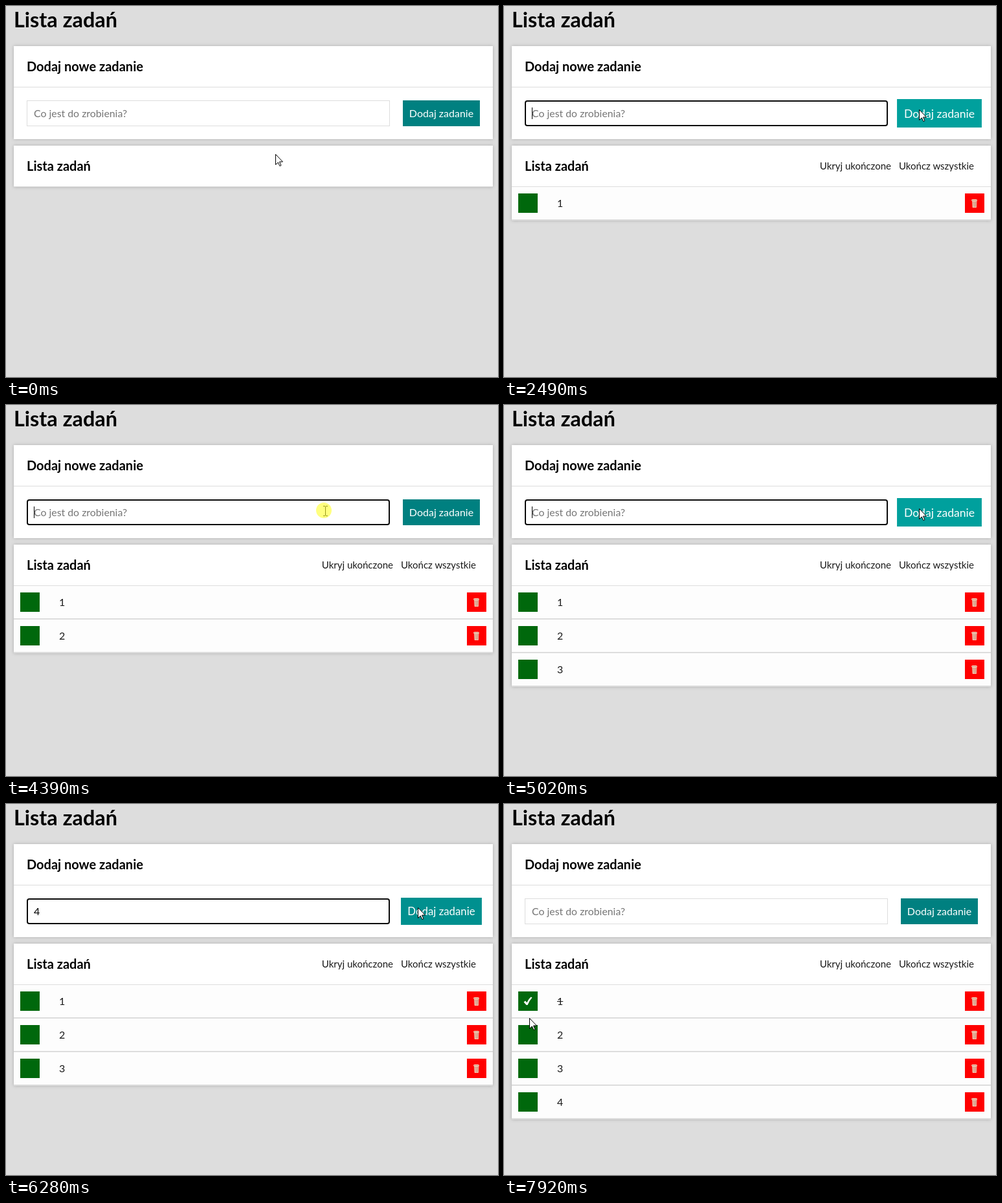
Recreate the animation shown at these times as an HTML page. Size 760 by 574 pixels, loop 8 s.

```html
<!DOCTYPE html>
<html lang="pl">
<head>
<meta charset="utf-8">
<title>Lista zadań</title>
<style>
  html, body { margin: 0; width: 100%; height: 100%; overflow: hidden; }
  body { position: relative; background: #ddd; color: #000; font: 16px Lato, sans-serif; cursor: default; }
  body * { box-sizing: border-box; }
  h1, h2 { margin: 0; font-weight: 700; white-space: nowrap; }
  h1 { position: absolute; left: 12px; top: 1px; font-size: 32.4px; }
  h2 { height: 64px; padding-left: 20px; border-bottom: 1px solid #ddd; font-size: 20px; line-height: 63px; }
  section { position: absolute; left: 12px; width: 740px; background: #fff; box-shadow: 0 0 5px #aaa; }
  #form { top: 62px; height: 144px; }
  #list { top: 216px; }
  #field, #add { position: absolute; top: 84px; height: 40px; line-height: 40px; white-space: nowrap; }
  #field { left: 20px; width: 561px; padding-left: 11px; box-shadow: inset 0 0 0 1px #ddd; }
  #field.focus { border-radius: 4px; box-shadow: inset 0 0 0 2px #0a0a0a; }
  #caret { display: inline-block; width: 1px; height: 18px; margin-right: -1px; background: #000; vertical-align: -3px; }
  #hint { color: #757575; font-size: 15.85px; }
  #add { left: 601px; width: 119px; text-align: center; color: #fff; }
  #links { position: absolute; right: 26px; top: 0; display: flex; gap: 12px; color: #1a1a1a; font-size: 15px; line-height: 63px; white-space: nowrap; }
  .row { position: relative; height: 52px; background: #fdfdfd; border-bottom: 2px solid #ddd; line-height: 30px; }
  .row > * { position: absolute; top: 10px; height: 30px; }
  .box { left: 10px; width: 30px; background: #00680c; }
  .box.hover { background: #007c10; }
  .label { left: 70px; color: #1a1a1a; }
  .bin { left: 700px; width: 30px; background: #f00; }
  .done .label { text-decoration: line-through; }
  .tick { visibility: hidden; }
  .done .tick { visibility: visible; }
  svg { display: block; }
  #pointer { position: absolute; left: 0; top: 0; overflow: visible; }
</style>
</head>
<body>
<h1>Lista zadań</h1>
<section id="form">
  <h2>Dodaj nowe zadanie</h2>
  <div id="field"><span id="typed"></span><span id="caret"></span><span id="hint">Co jest do zrobienia?</span></div>
  <div id="add">Dodaj zadanie</div>
</section>
<section id="list">
  <h2>Lista zadań</h2>
  <div id="links"><span>Ukryj ukończone</span><span>Ukończ wszystkie</span></div>
</section>
<svg id="pointer" width="1" height="1">
  <path id="arrow" d="M.5 .5V16.5L4.3 13L6.9 18.6L9 17.6L6.5 12H11.5Z" fill="#fff" stroke="#000"/>
  <path id="beam" d="M-3 -7.5H0M1 -7.5H4M.5 -7V7M-3 7.5H0M1 7.5H4" fill="none" stroke="#333"/>
  <circle id="press" cx="-2" cy="-1" r="12" fill="#ff0" fill-opacity=".5"/>
</svg>
<script>
const LOOP = 8000, TICK = 125.4, CHECK = 62;
const $ = id => document.getElementById(id);

// Each round: click the field at (x, y), type a digit, press the button, leave it.
const rounds = [
  { click: 8, type: 13, add: 20, leave: 21, x: 320, y: 171 },
  { click: 25, type: 26, add: 31, leave: 31, x: 515, y: 165 },
  { click: 35, type: 36, add: 40, leave: 40, x: 493, y: 164 },
  { click: 44, type: 45, add: 52, leave: 54, x: 470, y: 164 }
];

// Places where the pointer rests, with ticks of arrival and departure.
const stop = (arrive, leave, x, y) => ({ arrive, leave, x, y });
const stops = [
  stop(0, 0, 416, 229),
  stop(5, 8, 320, 171),
  ...rounds.flatMap(r => [stop(r.click, r.type, r.x, r.y), stop(r.add - 1, r.leave, 641, 160)]),
  stop(56, 56, 420, 189),
  stop(61, CHECK, 40, 309),
  stop(63, 64, 39, 331)
];

const rows = rounds.map((_, i) => {
  const row = document.createElement('div');
  row.className = 'row';
  row.innerHTML = `
    <div class="box"><svg class="tick" width="30" height="30">
      <path d="M8.5 16.5L11 14.5L13.3 17.2Q16 11.5 19.5 8.5L21.5 9.5Q17 14.5 14.5 21H12.5Z" fill="#fff"/></svg></div>
    <div class="label">${i + 1}</div>
    <div class="bin"><svg width="30" height="30" fill="#c9806c" stroke="#ffe6cc">
      <path d="M11.5 10.5L12 21.5H17.5L18 10.5M13.5 12V21M15.5 12V21" stroke-width=".8"/>
      <rect x="10.5" y="9.5" width="8" height="2" rx="1"/></svg></div>`;
  $('list').append(row);
  return row;
});
const firstBox = rows[0].querySelector('.box');

const clamp = v => Math.min(1, Math.max(0, v));
const easeOut = f => 1 - (1 - f) ** 2;
const show = (el, on) => { el.style.display = on ? '' : 'none'; };

function pointerAt(k) {
  const i = stops.findIndex(s => k <= s.leave);
  const to = stops[i], from = stops[i - 1] ?? to;
  const f = k >= to.arrive ? 1 : easeOut((k - from.leave) / (to.arrive - from.leave));
  return ['x', 'y'].map(c => Math.round(from[c] + (to[c] - from[c]) * f));
}

function draw(k) {
  const [x, y] = pointerAt(k);
  const pressing = rounds.some(r => k === r.add - 1);
  const focused = k >= rounds[0].click && k < CHECK && !pressing;
  const current = rounds.findIndex(r => k >= r.type && k < r.add);
  const reset = Math.max(...rounds.flatMap(r => [r.click, r.type, r.add]).filter(t => t <= k));

  $('field').classList.toggle('focus', focused);
  $('typed').textContent = current < 0 ? '' : current + 1;
  show($('hint'), current < 0);
  show($('caret'), focused && (k - reset) % 8 < 4);

  // The button grows and shrinks over two ticks.
  const hover = Math.max(...rounds.map(r => clamp(Math.min(k - r.add + 3, r.leave + 3 - k) / 2)));
  $('add').style.transform = hover ? `scale(${1 + hover * 0.1})` : 'none';
  $('add').style.background = `rgb(0, ${128 + 32 * hover}, ${128 + 29 * hover})`;

  rows.forEach((row, i) => show(row, k >= rounds[i].add));
  show($('links'), k >= rounds[0].add);
  rows[0].classList.toggle('done', k >= CHECK);
  firstBox.classList.toggle('hover', x >= 22 && x < 52 && y >= 290 && y < 320);

  const overField = x >= 32 && x < 593 && y >= 146 && y < 191;
  $('pointer').style.transform = `translate(${x}px, ${y}px)`;
  show($('beam'), overField);
  show($('arrow'), !overField);
  show($('press'), pressing || k === CHECK || rounds.some((r, i) => i && k === r.click));
}

function frame() {
  const t = performance.now() % LOOP;
  draw(Math.min(63, Math.floor((t + 25) / TICK)));
  requestAnimationFrame(frame);
}
frame();
</script>
</body>
</html>
```
